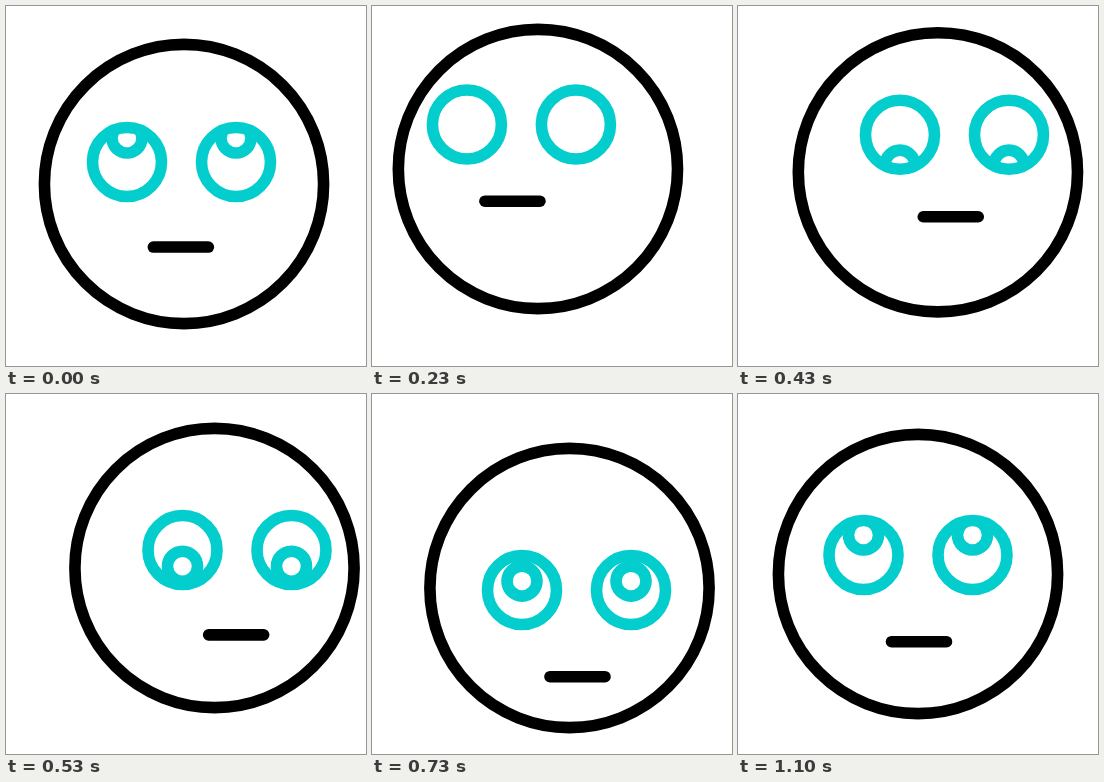
An HTML page for the animation above (1.67 s loop, 360 by 360 pixels).

```html
<!DOCTYPE html>
<html lang="en">
<head>
<meta charset="utf-8">
<title>Rolling eyes</title>
<style>
  html, body { margin: 0; width: 100%; height: 100%; overflow: hidden; background: #fff; }
  svg { display: block; width: 100%; height: 100%; fill: none; stroke: #000; stroke-width: 11.6; }
  .eye { stroke: #03cdcd; }
</style>
</head>
<body>
<svg viewBox="0 0 360 360">
  <defs>
    <clipPath id="lid"><circle r="36"/></clipPath>
    <g id="eye">
      <g clip-path="url(#lid)"><circle id="iris" r="15"/></g>
      <circle r="34.5"/>
    </g>
  </defs>
  <circle id="head" r="139.6"/>
  <g id="eyes" class="eye">
    <use href="#eye"/>
    <use href="#eye" x="109"/>
  </g>
  <path id="mouth" d="M-27.5 0H27.5" stroke-linecap="round"/>
</svg>
<script>
const LOOP = 1670, FPS = 30, LAST = 33;

// Turning points of the roll, as shifts from the resting pose
const POSES = [
  { n: 0, head: [-2, -2], face: [-4.5, -5] },
  { n: 6, head: [-16.5, -16.5], face: [-36, -39] },
  { n: 10, head: [4.5, -17.7], face: [9, -49] },
  { n: 16, head: [28.5, -6], face: [51, -5] },
  { n: 22, head: [17.5, 14], face: [24.5, 35] },
  { n: 28, head: [4, 3.5], face: [-3.5, 16.5] },
  { n: LAST, head: [0, 0], face: [0, 0] }
];

const $ = id => document.getElementById(id);
const move = (id, x, y) => $(id).setAttribute('transform', `translate(${x} ${y})`);

function ease(u) {
  u = Math.max(0, Math.min(1, u));
  return u * u * (3 - 2 * u);
}

// Smooth curve through the poses that never overshoots a turning point
function shift(n, part, axis) {
  const val = i => POSES[i][part][axis];
  const rise = i => (val(i + 1) - val(i)) / (POSES[i + 1].n - POSES[i].n);
  const slope = i => {
    if (i === 0) return rise(0);
    if (i === POSES.length - 1) return 0;
    const a = rise(i - 1), b = rise(i);
    return a * b > 0 ? 2 * a * b / (a + b) : 0;
  };
  let i = 0;
  while (i < POSES.length - 2 && n >= POSES[i + 1].n) i++;
  const span = POSES[i + 1].n - POSES[i].n;
  const u = (n - POSES[i].n) / span, v = 1 - u;
  return val(i) + (val(i + 1) - val(i)) * ease(u)
    + span * u * v * (v * slope(i) - u * slope(i + 1));
}

// The iris slips out at the top, then rises again from below
const irisY = n => n < 6 ? -24 - 7 * n : -20 + 82 * ease((28 - n) / 26);

// The mouth runs ahead of the eyes early in the roll
const lead = n => 10.5 * ease((n + 1.5) / 6) * ease((20 - n) / 15);

function draw(now) {
  const t = Math.floor(now % LOOP / 10) * 10 + 5;
  const n = Math.min(LAST, Math.floor(t * FPS / 1000));
  const faceX = shift(n, 'face', 0), faceY = shift(n, 'face', 1);
  move('head', 180 + shift(n, 'head', 0), 180 + shift(n, 'head', 1));
  move('eyes', 125.5 + faceX, 161 + faceY);
  move('mouth', 181 + faceX - lead(n), 247.7 + faceY - lead(n));
  move('iris', 0, irisY(n));
  requestAnimationFrame(draw);
}
draw(performance.now());
</script>
</body>
</html>
```
